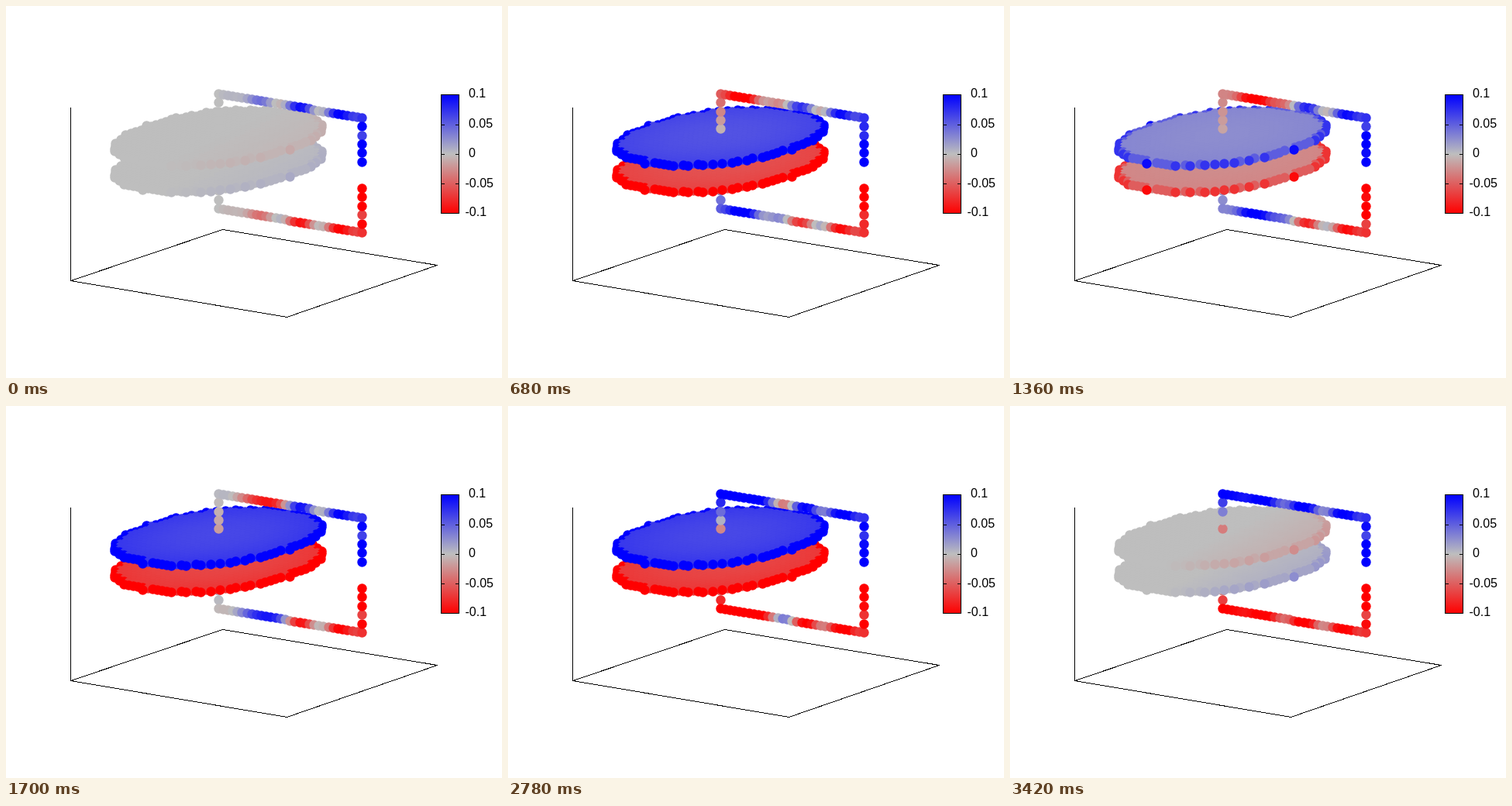
These frames come from a looping animation (640 px wide and 480 px high, 3440 ms). An HTML page with a canvas:

```html
<!DOCTYPE html>
<html lang="en">
<head>
<meta charset="utf-8">
<title>Charge on two plates and a wire loop</title>
<style>
  html, body { margin: 0; width: 100%; height: 100%; overflow: hidden; background: #fff; }
  canvas, svg { position: absolute; left: 0; top: 0; display: block; }
  text { font: 16px "Liberation Sans", Arial, sans-serif; white-space: pre; }
</style>
</head>
<body>
<canvas id="plot" width="640" height="480"></canvas>
<svg width="640" height="480" viewBox="0 0 640 480">
  <defs>
    <linearGradient id="scale" x1="0" y1="0" x2="0" y2="1">
      <stop offset="0" stop-color="#00f"/>
      <stop offset=".5" stop-color="#bebebe"/>
      <stop offset="1" stop-color="#f00"/>
    </linearGradient>
  </defs>
  <g fill="none" stroke="#000" shape-rendering="crispEdges">
    <path d="M83.5 131V354.5L279.5 288.5L556.5 334.5L362.5 401.5L83.5 354.5"/>
    <rect x="561.5" y="114.5" width="23" height="153" fill="url(#scale)"/>
    <path d="M561 153.5h5M580 153.5h5M561 191.5h5M580 191.5h5M561 229.5h5M580 229.5h5"/>
  </g>
  <g>
    <text x="592.5" y="118"> 0.1</text>
    <text x="592.5" y="157"> 0.05</text>
    <text x="592.5" y="195"> 0</text>
    <text x="592.5" y="234">-0.05</text>
    <text x="592.5" y="271">-0.1</text>
  </g>
</svg>
<script>
const ctx = document.getElementById('plot').getContext('2d');
const LOOP = 3440, STEP = 20, CYCLE = 1140;
const CX = 274, TOP = 170.2, LOW = 204.4, RISE = 11.4;
const AX = [92.7, 15.6], AY = [97.5, -33];
const N = 15; // grid cells per plate radius

const mix = (a, b, f) => a + (b - a) * f;

function color(v) {
  const k = Math.min(1, Math.abs(v) * 10);
  const low = Math.round(190 * (1 - k)), high = Math.round(190 + 65 * k);
  return v > 0 ? `rgb(${low},${low},${high})` : `rgb(${high},${low},${low})`;
}

function dot(x, y, v) {
  ctx.fillStyle = color(v);
  ctx.beginPath();
  ctx.arc(Math.floor(x) + 0.5, Math.floor(y) + 0.5, 6.2, 0, Math.PI * 2);
  ctx.fill();
}

// Square grid cut to a disc, sorted back to front; open sides gather charge
const inside = (i, j) => i * i + j * j <= N * N;
const plate = [];
for (let i = -N; i <= N; i++) {
  for (let j = -N; j <= N; j++) {
    if (!inside(i, j)) continue;
    const open = 4 - inside(i + 1, j) - inside(i - 1, j) - inside(i, j + 1) - inside(i, j - 1);
    plate.push({
      x: (i * AX[0] + j * AY[0]) / N,
      y: (i * AX[1] + j * AY[1]) / N,
      gain: 1 + 0.15 * (i * i + j * j) / (N * N) + 0.85 * open
    });
  }
}
plate.sort((a, b) => a.y - b.y);

function drawPlate(cy, sign, t) {
  const phase = t / CYCLE * Math.PI * 2;
  const level = 0.031 * (1 - Math.cos(phase)) + 0.006 * Math.max(0, Math.sin(phase));
  const back = mix(0.003, 0.007, t / LOOP) * Math.cos(phase / 2) ** 60;
  for (const p of plate) {
    const side = Math.min(1, Math.max(0, p.x / 120 + p.y / 60));
    dot(CX + p.x, cy + p.y, sign * p.gain * (level - back * side));
  }
}

// Charge along the beam: a ramp, a dip that drifts right, and a standing ripple
function beamCharge(u, t) {
  const p = t / LOOP;
  const left = 0.1 * p * p - 0.05 * Math.sin(2 * Math.PI * p ** 1.2);
  const center = 0.08 + 0.47 * p;
  const dip = 0.13 * Math.sqrt(Math.sin(Math.PI * p)) * Math.exp(-(((u - center) / 0.13) ** 2));
  const sway = 0.02 * Math.sin(2 * Math.PI * t / CYCLE);
  const ripple = 0.36 * u * u * (1 - u) * Math.cos(2 * Math.PI * (u - 0.57 - sway) / 0.29);
  return mix(left, 0.075, u) - dip + ripple;
}

const sideCharge = (f, t) =>
  mix(0.075, 0.12, f) + 0.03 * Math.sin(Math.PI * f) * Math.sin(11 * f + t / 90);

// dir is -1 for the upper half of the loop and 1 for its mirror below
function drawWire(cy, dir, t) {
  const put = (x, y, v) => dot(x, y, -dir * v);
  const y0 = cy + dir * 5 * RISE, w = 2 * AX[0], h = 2 * AX[1];
  for (let i = 1; i < 5; i++) {
    put(CX, cy + dir * i * RISE, mix(-0.035 * t / LOOP, beamCharge(0, t), (i - 1) / 4));
  }
  for (let i = 0; i <= 2 * N; i++) {
    const u = i / (2 * N);
    put(CX + u * w, y0 + u * h, beamCharge(u, t));
  }
  for (let i = 1; i <= 5; i++) {
    put(CX + w, y0 + h - dir * i * RISE, sideCharge(i / 5, t));
  }
}

function frame() {
  const t = Math.floor(performance.now() % LOOP / STEP) * STEP;
  ctx.clearRect(0, 0, 640, 480);
  drawWire(LOW, 1, t);
  drawPlate(LOW, -1, t);
  drawPlate(TOP, 1, t);
  drawWire(TOP, -1, t);
  requestAnimationFrame(frame);
}
frame();
</script>
</body>
</html>
```
